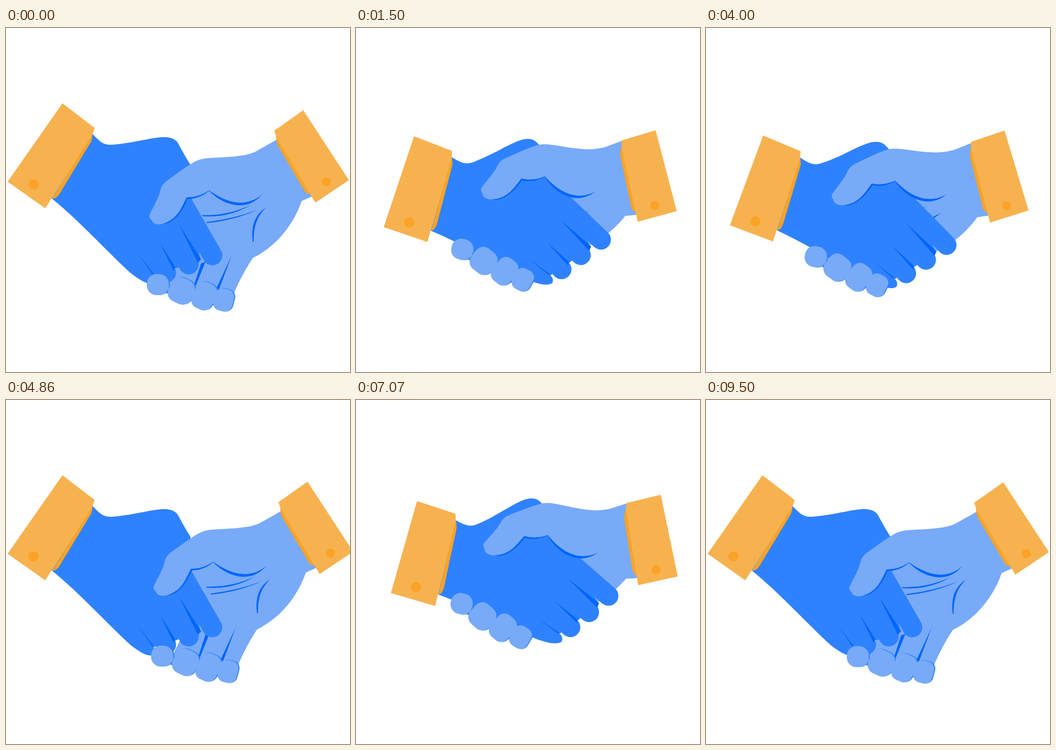
Write an HTML page without scripts that moves like this. It is 640 by 640 pixels and loops after 9570 ms.

```html
<!DOCTYPE html>
<html lang="en">
<head>
<meta charset="utf-8">
<title>Handshake</title>
<style>
  /* grip: 0 open, 1 clasped; lift: height of the shake; slide: right arm drawn back */
  @property --grip { syntax: "<number>"; inherits: true; initial-value: 0; }
  @property --lift { syntax: "<number>"; inherits: true; initial-value: 0; }
  @property --slide { syntax: "<number>"; inherits: true; initial-value: 0; }

  html, body { margin: 0; height: 100%; overflow: hidden; background: #fff; }
  svg {
    display: block; width: 100vw; height: 100vh;
    --loop: 9570ms;
    animation: ease-in-out infinite;
    animation-name: grip, lift, slide;
    animation-duration: calc(var(--loop) / 2), calc(var(--loop) / 2), var(--loop);
  }
  @keyframes grip {
    0%, 2%, 98.5%, 100% { --grip: 0; }
    20%, 80% { --grip: 1; }
  }
  @keyframes lift {
    0%, 26%, 55.6%, 78%, 100% { --lift: 0; }
    44.7% { --lift: 1.7; }
    67% { --lift: 1.05; }
  }
  @keyframes slide {
    0%, 40%, 60%, 100% { --slide: 0; }
    50% { --slide: 1; }
  }

  .left {
    transform-origin: 105px 140px;
    transform:
      translate(calc(1.5px * var(--grip) + 5px * var(--lift)), calc(65px * var(--grip) - 12px * var(--lift)))
      rotate(calc(-15.8deg * var(--grip) - 2.3deg * var(--lift)));
  }
  .right {
    transform-origin: 553px 153px;
    transform:
      translate(calc(2px * var(--grip) + 8.5px * var(--lift) + 8px * var(--slide)), calc(41px * var(--grip) - 12.5px * var(--lift) - var(--slide) * 1px))
      rotate(calc(17.8deg * var(--grip) + 2.6deg * var(--lift)));
  }
  .tips { transform-origin: 283px 477px; transform: rotate(calc(-5deg * var(--grip))); }
  .thumb { transform-origin: 362px 240px; transform: rotate(calc(-6.5deg * var(--grip))); }

  .mid { fill: #2f82ff; }
  .light { fill: #78aaf8; }
  .crease { fill: #0065ff; }
  .cuff { fill: #f7b250; }
  .trim { fill: #faa327; }
  .line { fill: none; stroke: #2f82ff; stroke-linecap: round; }
</style>
</head>
<body>
<svg viewBox="0 0 640 640">
  <defs>
    <g id="tips">
      <rect x="262" y="458" width="41" height="39" rx="18"/>
      <rect x="303" y="465" width="46" height="48" rx="17" transform="rotate(25 326 489)"/>
      <rect x="348" y="472.5" width="41" height="52" rx="16" transform="rotate(25 368.5 498.5)"/>
      <rect x="387" y="485" width="36" height="42" rx="14" transform="rotate(15 405 506)"/>
    </g>
  </defs>

  <!-- right palm -->
  <g class="right">
    <path class="light" d="M505 207 L340 300 L320 440 L300 480 L420 505 Q432 470 459 428 C505 405 535 365 550 322 L570 313Z"/>
    <path class="crease" d="M365 348 Q412 350 456 329 Q414 354 365 350Z
      M373 361 Q425 355 468 338 Q425 358 373 363Z
      M484 334 Q453 353 459 398 L461 397 Q459 357 484 334Z
      M363 438 L371 435 L352 482 L348 484Z
      M420 423 L396 487 L391 485Z"/>
  </g>

  <!-- left hand -->
  <g class="left">
    <path class="mid" d="M161 197 C175 212 182 219 200 217 C240 214 275 202 297 203 Q315 204 321 216 Q335 242 343 254 L346 317 L361 430 L314 448 L275 460 Q280 468 274 475 C262 478 248 468 232 456 C190 418 140 362 85 317Z"/>
    <path class="line" stroke-width="37" d="M330 329 L384 423 M300 370 L340 440 M265 390 L298 455"/>
    <path class="crease" d="M322 366 L363 430 L357 437Z M286 399 L315 445 L312 452Z M245 419 L275 458 L272 458Z"/>
    <path class="trim" d="M161 196 Q161 209 155 217 L100 308 Q93 319 86 317Z"/>
    <path class="cuff" d="M105 140 L165 186 L161 198 L73 335.5 L3 286Z"/>
    <circle class="trim" cx="51" cy="291" r="9.5"/>
  </g>

  <!-- right fingertips, thumb and cuff -->
  <g class="right">
    <g class="tips">
      <path class="line" stroke-width="16" d="M290 483 L385 508"/>
      <use href="#tips" class="mid" x="2" y="-.5"/>
      <use href="#tips" class="light"/>
    </g>
    <g class="thumb">
      <path class="crease" d="M280 361 C303 373 325 350 338 318 Q358 319 378 303 C398 325 445 347 476 310 L440 290 L300 310Z"/>
      <path class="light" d="M505 207 L475 226 Q455 235 440 237 C410 242 375 240 360 245 C345 250 325 266 301 283 C288 293 289 297 286 307 C281 322 273 334 267 348 Q266 354 271 357 C273 366 285 367 295 363 C318 355 325 338 336 315 Q357 316 378 302 C400 318 440 340 476 310 L560 300Z"/>
    </g>
    <path class="trim" d="M502 200 Q503 214 507 221 L553 299 Q559 310 567 309Z"/>
    <path class="cuff" d="M553 153 L638 283 L575.5 325 L503 203 L499 191Z"/>
    <circle class="trim" cx="596" cy="286" r="8.5"/>
  </g>
</svg>
</body>
</html>
```
